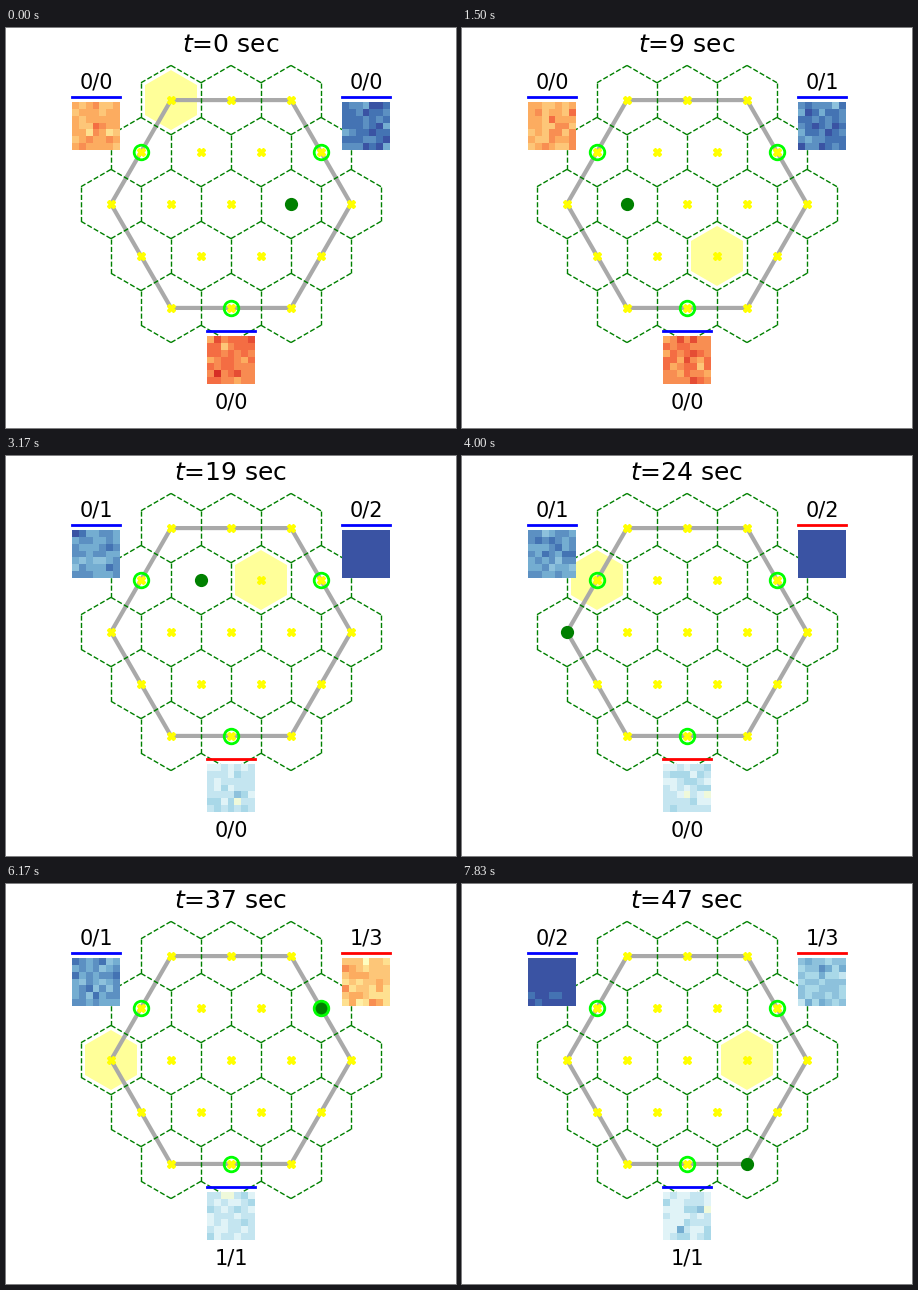
Recreate the animation shown at these times as a matplotlib script. Size 450 by 400 pixels, loop 8 s.

```python
import numpy as np
import matplotlib.pyplot as plt
from matplotlib.animation import FuncAnimation
from matplotlib.collections import LineCollection
from matplotlib.patches import Polygon

W, H, DPI = 450, 400, 100
FRAMES, INTERVAL = 160, 50
CX, CY, STEP = 225, 176, 60
ROW = STEP * np.sqrt(3) / 2

# Cells are numbered row by row, 0 to 18
CELLS = np.array([(CX + (i - (n - 1) / 2) * STEP, CY + (r - 2) * ROW)
                  for r, n in enumerate((3, 4, 5, 4, 3)) for i in range(n)])
LEFT, RIGHT, BOTTOM = 3, 6, 17

# Stops as (second, cell)
WALK = [(0, 10), (1, RIGHT), (3, RIGHT), (9, 8), (11, LEFT), (12, LEFT),
        (15, RIGHT), (17, RIGHT), (20, LEFT), (24, 7), (28, RIGHT),
        (29, RIGHT), (31, 14), (33, BOTTOM), (36, RIGHT), (37, RIGHT),
        (41, LEFT), (42, LEFT), (46, 18)]
GAZE = [(0, 0), (9, 14), (19, 5), (24, LEFT), (31, 16), (37, 7), (47, 10)]


def cell_at(stops, t):
    """Go straight from stop to stop, snapped to the nearest cell."""
    times, cells = zip(*stops)
    spot = [np.interp(t, times, CELLS[list(cells), k]) for k in (0, 1)]
    return CELLS[np.argmin(np.hypot(*(CELLS - spot).T))]


def hexagon(x, y, r):
    a = np.radians(30 + 60 * np.arange(6))
    return np.column_stack((x + r * np.cos(a), y + r * np.sin(a)))


def hex_edges():
    edges = set()
    for x, y in CELLS:
        pts = [tuple(p) for p in hexagon(x, y, STEP / np.sqrt(3)).round(2)]
        for a, b in zip(pts, pts[1:] + pts[:1]):
            edges.add((min(a, b), max(a, b)))
    return sorted(edges)


class Box:
    """A noisy colour tile with a status bar and a rewards/presses label."""

    def __init__(self, ax, seed, x, y, base, presses, wins, ready, keys):
        self.seed, self.presses, self.wins = seed, presses, wins
        self.ready, self.keys = ready, keys
        self.tile = ax.imshow(np.zeros((7, 7)), cmap="RdYlBu", vmin=0, vmax=1,
                              extent=(x, x + 48, y + 48, y), aspect="auto",
                              interpolation="nearest", zorder=8)
        self.bar, = ax.plot([x, x + 48], [y - 5, y - 5], lw=2, zorder=9)
        self.label = ax.text(x + 24, base, "", fontsize=15, ha="center",
                             va="baseline", zorder=9)

    def update(self, t):
        level = np.interp(t, *zip(*self.keys))
        noise = np.random.default_rng([self.seed, t]).normal(0, 0.04, (7, 7))
        cells = np.round((level + noise) * 20) / 20
        self.tile.set_data(np.clip(cells, 0.05, 0.95))
        red = any(a <= t < b for a, b in self.ready)
        self.bar.set_color("red" if red else "blue")
        won = sum(t >= p for p in self.wins)
        tried = sum(t >= p for p in self.presses)
        self.label.set_text(f"{won}/{tried}")


plt.rcParams["font.family"] = "DejaVu Sans"
fig = plt.figure(figsize=(W / DPI, H / DPI), dpi=DPI, facecolor="white")
ax = fig.add_axes([0, 0, 1, 1])

gaze = ax.add_patch(Polygon(hexagon(*CELLS[0], 30), fc="#ffff99", ec="none",
                            zorder=1))
corners = CELLS[[0, 2, 11, 18, 16, 7]]
ax.add_patch(Polygon(corners, fc="none", ec="darkgray", lw=3, zorder=2))
ax.add_collection(LineCollection(hex_edges(), colors="green", linewidths=1,
                                 linestyles="--", zorder=3))
ax.plot(*CELLS.T, "X", color="yellow", ms=6, mew=1, zorder=4)
agent, = ax.plot([], [], "o", color="green", ms=8, mew=1.5, zorder=5)
ax.plot(*CELLS[[LEFT, RIGHT, BOTTOM]].T, "o", mfc="none", mec="lime",
        ms=10.5, mew=2, zorder=6)
title = ax.text(CX, 24, "", fontsize=18, ha="center", va="baseline")

boxes = [
    Box(ax, 1, 66, 74, 61, presses=(11, 41), wins=(), ready=(),
        keys=[(10, 0.31), (14, 0.82), (40, 0.83), (43, 0.99)]),
    Box(ax, 2, 336, 74, 61, presses=(3, 16, 28), wins=(28,),
        ready=((23, 28), (34, 48)),
        keys=[(0, 0.89), (15, 0.86), (17, 0.99), (27, 0.99),
              (28, 0.34), (38, 0.36), (43, 0.75)]),
    Box(ax, 3, 201, 308, 381, presses=(33,), wins=(33,), ready=((14, 33),),
        keys=[(10, 0.23), (15, 0.63)]),
]

ax.set_xlim(0, W)
ax.set_ylim(H, 0)
ax.axis("off")


def draw(frame):
    t = (3 * frame + 2) // 10  # six clock seconds per second
    title.set_text(f"$t$={t} sec")
    x, y = cell_at(WALK, t)
    agent.set_data([x], [y])
    gaze.set_xy(hexagon(*cell_at(GAZE, t), 30))
    for box in boxes:
        box.update(t)


anim = FuncAnimation(fig, draw, frames=FRAMES, init_func=lambda: draw(0),
                     interval=INTERVAL, repeat=True, repeat_delay=0)
plt.show()
```
